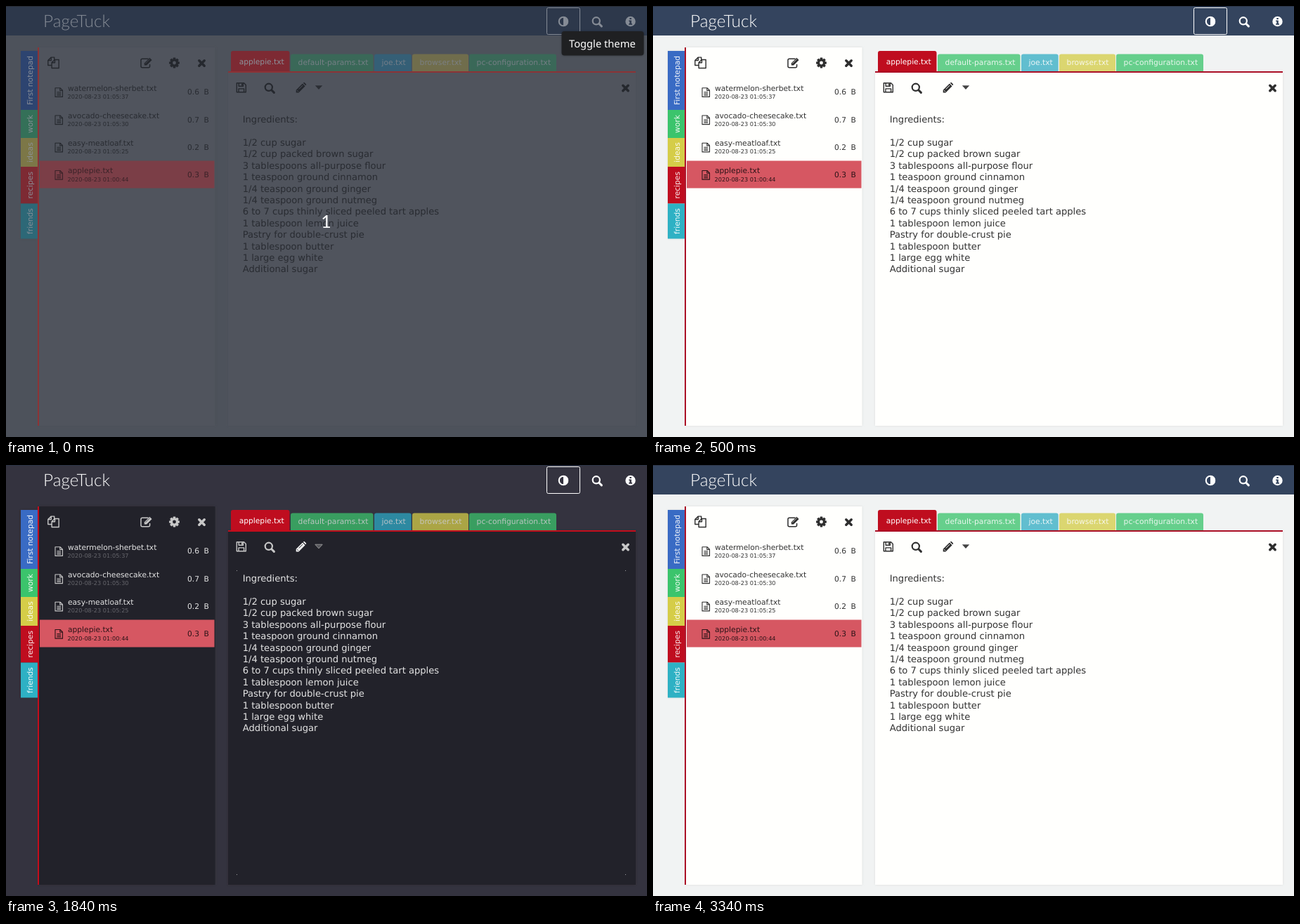
Animation of 912 by 614 pixels, one loop 3.7 s. Source, as an HTML page:

```html
<!DOCTYPE html>
<html lang="en">
<head>
<meta charset="utf-8">
<title>Notes theme toggle</title>
<style>
html, body { margin: 0; width: 100%; height: 100%; overflow: hidden; }
svg { display: block; width: 912px; height: 614px; font: 10.7px "DejaVu Sans", sans-serif; text-rendering: geometricPrecision; }
.light {
  --edge: #2b3446; --bg: #f1f3f3; --header: #34445e; --panel: #fffffd; --shadow: #d9dcdc;
  --text: #333; --date: #333; --icon: #2e2e2e; --pencil: #2e2e2e; --caret: #444; --caretEdge: none; --head: #fff;
  --line: #ab0f26; --row: #d65762; --rowText: #2c1418; --label: #fff; --tabOpacity: .76;
  --blue: #396bc4; --green: #3bc46c; --yellow: #d5cd48; --red: #bf0d1f; --teal: #2eb1c4; --sky: #35aec5;
}
.dark {
  --edge: #2b3446; --bg: #34333f; --header: #34333f; --panel: #22222a; --shadow: #2d2c36;
  --text: #e4e4e4; --date: #66666c; --icon: #c8c8c8; --pencil: #f4f4f4; --caret: #55555a; --caretEdge: #aaa; --head: #fff;
  --line: #c40d1c; --row: #d65762; --rowText: #2c1418; --label: #fff; --tabOpacity: .74;
  --blue: #396bc4; --green: #3bc46c; --yellow: #d5cd48; --red: #bf0d1f; --teal: #2eb1c4; --sky: #2ba7c4;
}
.dim {
  --edge: #272b33; --bg: #4d525b; --header: #2d384b; --panel: #50545d; --shadow: #494e57;
  --text: #292c32; --date: #292c32; --icon: #25282e; --pencil: #25282e; --caret: #2b2e34; --caretEdge: none; --head: #858b95;
  --line: #8c3336; --row: #7b3e47; --rowText: #3b2329; --label: #8d929b; --tabOpacity: .75;
  --blue: #2d4470; --green: #347058; --yellow: #7c7747; --red: #7d2a33; --teal: #2d6877; --sky: #2d6480;
}
.head { fill: var(--head); }
.icon { fill: var(--icon); stroke: none; }
.outline { fill: none; stroke: currentColor; }
</style>
</head>
<body>
<svg id="stage" viewBox="0 0 912 614" class="dim"></svg>
<script>
const stage = document.getElementById('stage');

const rect = (x, y, w, h, fill, extra = '') =>
  `<rect x="${x}" y="${y}" width="${w}" height="${h}" fill="${fill}" ${extra}/>`;
const text = (x, y, str, fill, extra = '') =>
  `<text x="${x}" y="${y}" fill="${fill}" ${extra}>${str}</text>`;
const at = (x, y, color, body, extra = '') =>
  `<g transform="translate(${x} ${y})" style="color:${color}" fill="currentColor" ${extra}>${body}</g>`;
const stroke = (d, width = 1.4, extra = '') =>
  `<path class="outline" d="${d}" stroke-width="${width}" stroke-linejoin="round" ${extra}/>`;
const v = name => `var(--${name})`;

// Icons are centred on 0,0.
const teeth = [0, 45, 90, 135].map(a =>
  `<rect x="-1.8" y="-7.4" width="3.6" height="14.8" rx=".7" transform="rotate(${a})"/>`).join('');
const icons = {
  adjust: '<circle class="outline" r="6.2" stroke-width="2.1"/><path d="M0-7A7 7 0 0 1 0 7Z"/>',
  search: '<circle class="outline" cx="-1.2" cy="-1.2" r="5.1" stroke-width="2.2"/>' +
    stroke('M2.8 2.8L6.4 6.4', 3, 'stroke-linecap="round"'),
  info: `<circle r="7.2"/><path fill="${v('header')}" d="M-1.2-5h2.5v2.1h-2.5ZM-2.3-1.6h3.6v4.6h1.1v1.7h-4.7v-1.7h1.1v-2.9h-1.1Z"/>`,
  copy: stroke('M-2.6 3.7H-7.7V-3.3L-3.2-7.7H1.2V-4M-7.5-3.3H-3.2V-7.5M-2.4 7.7V-.3L2-4.3H7.7V7.7ZM-2.2 0H2V-4.1'),
  edit: stroke('M3-5.8H-5.6Q-7.6-5.8-7.6-3.8V4.8Q-7.6 6.8-5.6 6.8H3Q5 6.8 5 4.8V2', 1.5) +
    '<path d="M-2.8 3.6V.4L4.8-7.2L8 -4L.4 3.6Z"/>' +
    `<path d="M-1.4 1L5-5.3" stroke="${v('panel')}" stroke-width=".7"/>`,
  cog: `<circle r="5.7"/>${teeth}<circle r="2.4" fill="${v('panel')}"/>`,
  close: stroke('M-3.7-3.7L3.7 3.7M3.7-3.7L-3.7 3.7', 3.5, 'stroke-linecap="round"'),
  file: stroke('M-5.2-6.3H1.8L5.3-2.8V6.4H-5.2ZM1.6-6.2V-2.6H5.2M-2.8-.3H3M-2.8 1.8H3M-2.8 3.9H3', 1.1),
  save: stroke('M-6.5-6.5H3.8L6.5-3.8V6.5H-6.5ZM-3.6-6.4V-2.1H2.6V-6.4M-3.8 6.3V1.6H3.8V6.3', 1.4) +
    '<path d="M.2-5.7h1.7v2.8h-1.7Z"/>',
  pencil: '<path d="M-7 7V3.3L2.2-5.9L5.9-2.2L-3.3 7ZM3.1-6.8L4-7.5Q4.6-7.9 5.2-7.3L7.2-5.3Q7.7-4.7 7.2-4.1L6.6-3.2Z"/>' +
    `<path d="M-5.6 3.7L-3.7 5.6M-3 2L2.4-3.4" stroke="${v('panel')}" stroke-width="1"/>`,
  caret: `<path d="M-5.2-2.8H5.2L0 2.9Z" stroke="${v('caretEdge')}" stroke-width=".8"/>`
};
const icon = (name, x, y, color = v('icon')) => at(x, y, color, icons[name]);

function header() {
  return rect(0, 0, 912, 42, v('header')) + rect(0, 0, 912, 1, v('edge')) +
    text(53, 30, 'PageTuck', v('head'), 'style="font:300 24.3px Lato,sans-serif"') +
    icon('adjust', 793, 22, v('head')) + icon('search', 841, 22.5, v('head')) + icon('info', 888.5, 22, v('head')) +
    `<rect id="focus" x="769.5" y="2.5" width="47" height="38" rx="2" fill="none" stroke="${v('head')}"/>`;
}

function sidebar() {
  const books = [['First notepad', 64, 148, 'blue'], ['work', 148, 188, 'green'], ['ideas', 188, 229, 'yellow'],
    ['recipes', 229, 281.5, 'red'], ['friends', 281.5, 331.5, 'teal']];
  return rect(21, 64, 24, 267.5, v('shadow'), 'filter="url(#soft)"') +
    books.map(([name, top, bottom, color]) => rect(21, top, 24, bottom - top, v(color)) +
      text(0, 0, name, v('label'),
        `text-anchor="middle" opacity=".93" transform="translate(37.5 ${(top + bottom) / 2}) rotate(-90)"`)).join('');
}

const panel = (x, y, w, h) => rect(x, y, w, h, v('shadow'), 'filter="url(#soft)"') + rect(x, y, w, h, v('panel'));

function fileList() {
  const files = [['watermelon-sherbet', '05:37', '0.6'], ['avocado-cheesecake', '05:30', '0.7'],
    ['easy-meatloaf', '05:25', '0.2'], ['applepie', '00:44', '0.3']];
  const rows = files.map(([name, time, size], i) => {
    const y = 122.5 + i * 39.25, selected = i === 3;
    const color = v(selected ? 'rowText' : 'text');
    return (selected ? rect(48, 220.5, 248.5, 39, v('row')) : '') +
      icon('file', 75.2, y + .5, selected ? color : v('icon')) +
      text(88, y - 2, name + '.txt', color) +
      text(87.6, y + 9.4, `2020-08-23 01:${time}`, selected ? color : v('date'), 'font-size="8.2"') +
      text(258, y + 3.8, size, color) + text(281.4, y + 3.8, 'B', color);
  });
  return panel(47, 59, 250.5, 539) + rect(45, 59, 2, 539, v('line')) +
    icon('copy', 67.5, 80.8) + icon('edit', 199.6, 81) + icon('cog', 239.5, 81) + icon('close', 278.5, 81.5) +
    rows.join('');
}

function editor() {
  const tabs = [['default-params', 405, 522.5, 'green'], ['joe', 524, 576.7, 'sky'],
    ['browser', 578, 658, 'yellow'], ['pc-configuration', 659, 783, 'green']];
  const tab = (left, right, top, color) =>
    `<path d="M${left} 93V${top + 3}q0-3 3-3H${right - 3}q3 0 3 3V93Z" fill="${v(color)}"/>`;
  const recipe = ['Ingredients:', '', '1/2 cup sugar', '1/2 cup packed brown sugar', '3 tablespoons all-purpose flour',
    '1 teaspoon ground cinnamon', '1/4 teaspoon ground ginger', '1/4 teaspoon ground nutmeg',
    '6 to 7 cups thinly sliced peeled tart apples', '1 tablespoon lemon juice', 'Pastry for double-crust pie',
    '1 tablespoon butter', '1 large egg white', 'Additional sugar'];
  const corners = [[328, 150], [881, 150], [328, 583], [881, 583]];
  return panel(316, 94, 580, 504) +
    tabs.map(([name, left, right, color]) =>
      `<g opacity="${v('tabOpacity')}" style="opacity:var(--tabOpacity)">${tab(left, right, 68.5, color)}` +
      text(left + 10.6, 84.2, name + '.txt', v('label'), 'opacity=".88"') + '</g>').join('') +
    tab(320, 403.5, 64, 'red') + text(331.7, 83, 'applepie.txt', v('label')) +
    rect(316, 93, 580, 2, v('line')) +
    icon('save', 334.8, 116.3) + icon('search', 375, 117) + icon('pencil', 419.7, 116.5, v('pencil')) +
    icon('caret', 445, 116, v('caret')) + icon('close', 881.5, 117) +
    recipe.map((line, i) => text(336.7, 166.2 + i * 16.4, line, v('text'), 'font-size="13.1"')).join('') +
    `<g id="corners">${corners.map(([x, y]) => rect(x, y, 1, 1, '#a0a0a4')).join('')}</g>`;
}

function tooltip() {
  return '<g id="tooltip">' + rect(790.5, 36, 117, 35, '#000', 'rx="4" opacity=".25" filter="url(#soft)"') +
    rect(790.5, 36, 117, 34.5, '#1f2022', 'id="tipBox" rx="4"') +
    text(801, 58.5, 'Toggle theme', '#fff', 'style="font:14.7px \'Noto Sans\',sans-serif"') + '</g>';
}

stage.innerHTML = '<defs><filter id="soft" x="-20%" y="-20%" width="140%" height="140%"><feGaussianBlur stdDeviation="1.6"/></filter></defs>' +
  rect(0, 0, 912, 614, v('bg')) + header() + sidebar() + fileList() + editor() + tooltip() +
  text(455.5, 316, '1', '#fff', 'id="count" text-anchor="middle" style="font:25px Lato,sans-serif"');

const [focus, corners, tip, tipBox, count] =
  ['focus', 'corners', 'tooltip', 'tipBox', 'count'].map(id => document.getElementById(id));
const show = (el, on) => el.setAttribute('visibility', on ? 'visible' : 'hidden');

function draw() {
  const t = performance.now() % 3700;
  const theme = t < 100 ? 'dim' : t >= 700 && t < 2600 ? 'dark' : 'light';
  stage.setAttribute('class', theme);
  tipBox.setAttribute('fill', theme === 'dim' ? '#1f2022' : '#303030');
  show(count, theme === 'dim');
  show(tip, t < 200);
  show(corners, theme === 'dark');
  show(focus, t < 2800);
  requestAnimationFrame(draw);
}
draw();
</script>
</body>
</html>
```
